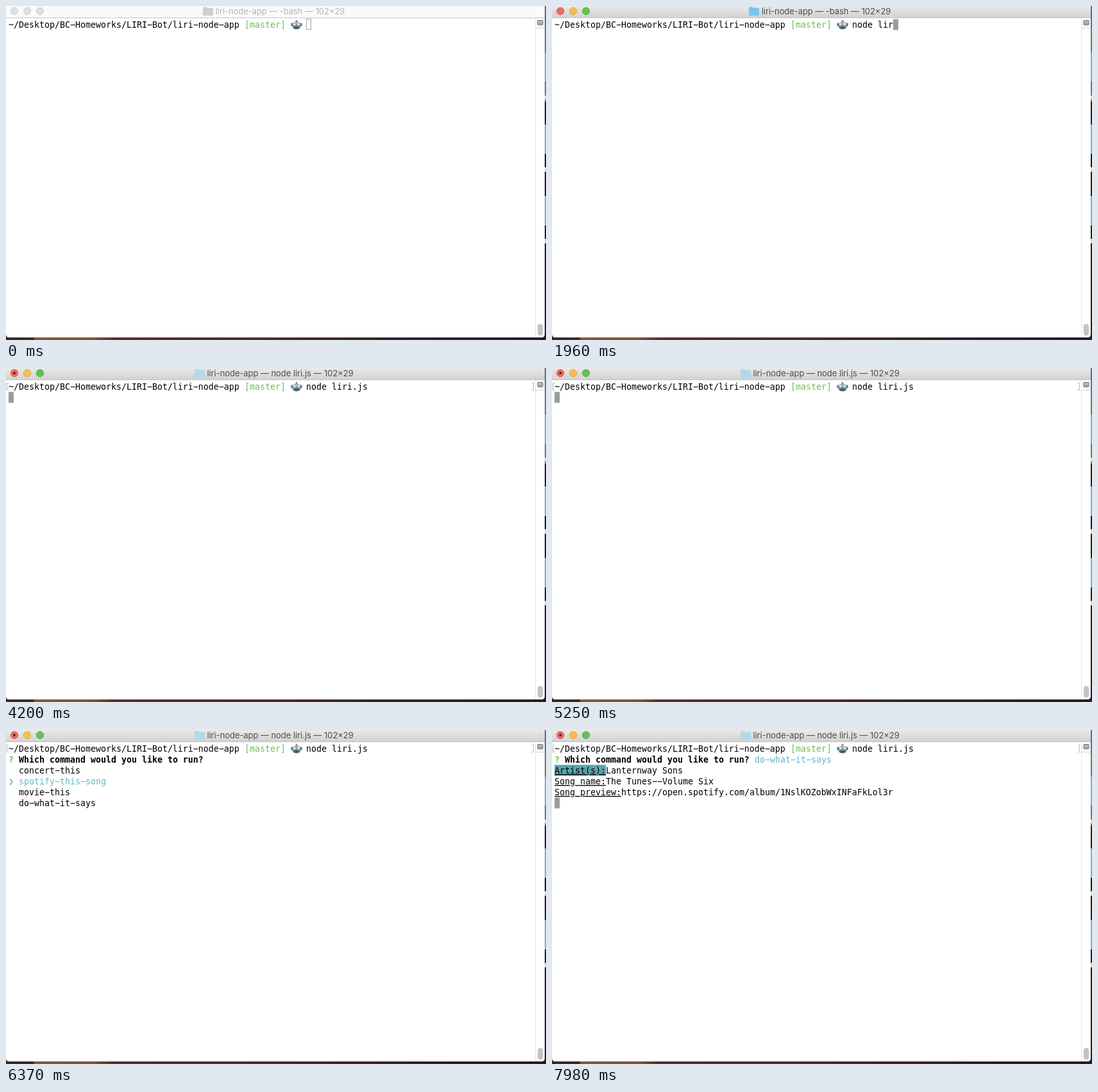
Animation, 842 px wide and 522 px high, one loop 8 s. Source, as an HTML page:

```html
<!DOCTYPE html>
<html lang="en">
<head>
<meta charset="utf-8">
<title>Terminal session</title>
<style>
  html, body { margin: 0; width: 842px; height: 522px; overflow: hidden; background: #fff; }
  svg { display: block; }
  text { white-space: pre; }
  #screen { font: 13.29px "DejaVu Sans Mono", "Liberation Mono", monospace; fill: #000; }
  #title { font: 12.9px Inter, sans-serif; text-anchor: middle; fill: #4c4c4c; }
  .bold { font-weight: bold; }
  .green { fill: #6fbf53; }
  .cyan { fill: #62bac5; }
  .mark { fill: #62bac5; font-weight: bold; }
  .grey { fill: #b2b2b2; }
  .under { text-decoration: underline; }
  .idle #title { fill: #b4b4b4; }
  .idle .light { fill: #dedede; stroke: #cfcfcf; }
  .idle #bar { fill: #fafafa; }
  .idle #folder { fill: #cfcfcf; }
</style>
</head>
<body>
<svg id="stage" width="842" height="522" viewBox="0 0 842 522">
  <defs>
    <linearGradient id="chrome" x2="0" y2="1">
      <stop stop-color="#e9e9e9"/><stop offset="1" stop-color="#d2d2d2"/>
    </linearGradient>
    <linearGradient id="desk">
      <stop stop-color="#38272a"/><stop offset=".05" stop-color="#3c2926"/>
      <stop offset=".054" stop-color="#80583a"/><stop offset=".16" stop-color="#80523a"/>
      <stop offset=".2" stop-color="#55302b"/><stop offset=".5" stop-color="#4b2b2d"/>
      <stop offset=".75" stop-color="#33202b"/><stop offset="1" stop-color="#291b23"/>
    </linearGradient>
    <linearGradient id="metal" x2="0" y2="1">
      <stop stop-color="#a5bec5"/><stop offset="1" stop-color="#526d78"/>
    </linearGradient>
    <g id="robot">
      <circle cx="8.5" cy="2" r="1.4" fill="#b9584f"/>
      <path d="M3 6Q8.5-1 14 6z" fill="#8ca8b0"/>
      <rect x="0" y="5" width="3" height="5" rx="1" fill="#4f6570"/>
      <rect x="14" y="5" width="3" height="5" rx="1" fill="#4f6570"/>
      <path d="M1.5 5Q8.5 3 15.5 5L14.5 12Q13 15 8.5 15T2.5 12z" fill="url(#metal)"/>
      <circle cx="5.3" cy="7" r="1.8" fill="#e3eef0"/><circle cx="11.7" cy="7" r="1.8" fill="#e3eef0"/>
      <path d="M8.5 7.5l1.2 2.2H7.3z" fill="#b8655c"/>
      <rect x="5" y="11" width="7" height="2" rx="1" fill="#35464e"/>
    </g>
  </defs>

  <rect width="842" height="522" fill="#2c1c22"/>
  <g id="edge"></g>
  <rect y="517" width="842" height="5" fill="url(#desk)"/>
  <path d="M0 0H840V513Q840 518 835 518H5Q0 518 0 513z" fill="#fff"/>
  <path id="bar" d="M0 0H840V18H0z" fill="url(#chrome)"/>
  <path d="M0 18.5H840" stroke="#c4c4c4"/>
  <g stroke-width=".8">
    <circle class="light" cx="13" cy="8" r="5.7" fill="#ed6a5f" stroke="#d3574d"/>
    <circle class="light" cx="33" cy="8" r="5.7" fill="#f5bf4f" stroke="#d7a23f"/>
    <circle class="light" cx="53" cy="8" r="5.7" fill="#61c454" stroke="#50a545"/>
  </g>
  <circle id="dirty" cx="13" cy="8" r="2" fill="#6b1712"/>
  <path id="folder" d="M0 2.5Q0 1 1.5 1H5.5L7 2.5H14.5Q16 2.5 16 4V13Q16 14.5 14.5 14.5H1.5Q0 14.5 0 13z"/>
  <text id="title" x="427.5" y="13"></text>

  <path d="M825.5 19V518" stroke="#e4e4e4"/>
  <path d="M825 34.5H840" stroke="#d2d2d2"/>
  <rect x="829" y="22.5" width="8" height="7" rx="1" fill="#e6e6e6" stroke="#4e4e4e"/>
  <path d="M830 25H836M830 27.5H836" stroke="#5c5c5c"/>
  <rect x="829" y="497" width="8" height="18" rx="4" fill="#c3c3c3"/>
  <g id="screen"></g>
</svg>

<script>
const LOOP = 8000, CELL = 8, ROW = 17;
const $ = id => document.getElementById(id);

const TYPING = [[0, 0], [1190, 1], [1260, 2], [1470, 3], [1610, 4], [1680, 5], [1750, 6],
  [1820, 7], [1960, 8], [2030, 9], [2450, 10], [2730, 11], [2800, 12]];
const CHOICE = [[5390, 0], [6020, 1], [6440, 2], [7070, 3]];
const AT = { focus: 840, cursor: 980, enter: 2870, title: 2940, dirty: 3290,
  menu: 5390, pick: 7630, result: 7980 };
const COMMAND = "node liri.js";
const OPTIONS = ["concert-this", "spotify-this-song", "movie-this", "do-what-it-says"];
const RESULT = [
  ["Artist(s):", "Lanternway Sons"],
  ["Song name:", "The Tunes--Volume Six"],
  ["Song preview:", "https://open.spotify.com/album/1NslKOZobWxINFaFkLol3r"]
];

// Desktop visible past the window's right side: top, height, colour
const EDGE = [[0, 32, "#597184"], [32, 41, "#77727a"], [73, 45, "#6eb5dc"], [118, 32, "#77727a"],
  [140, 6, "#d8d8d8"], [185, 46, "#6eb5dc"], [231, 20, "#18151a"], [252, 7, "#d9d9d9"],
  [297, 46, "#6eb5dc"], [364, 7, "#d5d5d5"]];
$("edge").innerHTML = EDGE.map(([y, h, c]) =>
  `<rect x="840" y="${y}" width="2" height="${h}" fill="${c}"/>`).join("");

const latest = (steps, t) => steps.filter(s => s[0] <= t).pop()[1];
const px = col => 4 + col * CELL;

// The terminal face has wide hyphens
const put = (row, col, str, cls = "") =>
  `<text x="${px(col)}" y="${34 + row * ROW}" class="${cls}">${str.replace(/-/g, "\u2212")}</text>`;

const block = (row, col, fill = "#9b9b9b", cells = 1) =>
  `<rect x="${px(col)}" y="${20.5 + row * ROW}" width="${cells * CELL}" height="17" fill="${fill}"/>`;

const hollow = (row, col) =>
  `<rect x="${px(col) + .5}" y="${20.5 + row * ROW}" width="7" height="16" fill="none" stroke="#a6a6a6"/>`;

function prompt(t) {
  const n = latest(TYPING, t);
  let out = put(0, 0, "~/Desktop/BC-Homeworks/LIRI-Bot/liri-node-app") +
    put(0, 46, "[master]", "green") +
    `<use href="#robot" x="444.5" y="21.5"/>` + put(0, 58, COMMAND.slice(0, n));
  if (t < AT.cursor) return out + hollow(0, 58);
  if (t < AT.enter) return out + block(0, 58 + n);
  return out + `<path d="M4 23.5H1.5V34.5H4M820 23.5H822.5V34.5H820" fill="none" stroke="#b5b5b5"/>`;
}

function menu(t) {
  const pick = latest(CHOICE, t);
  return (pick ? "" : put(1, 39, "(Use arrow keys)", "grey")) +
    OPTIONS.map((name, i) => i === pick
      ? put(i + 2, 0, "❯", "mark") + put(i + 2, 2, name, "cyan")
      : put(i + 2, 2, name)).join("");
}

function answer(t) {
  const picked = put(1, 39, OPTIONS[3], "cyan");
  if (t < AT.result) return picked + block(2, 0);
  return picked + block(2, 0, "#5aa3ad", 10) +
    RESULT.map(([label, value], i) =>
      put(i + 2, 0, label, "under") + put(i + 2, label.length, value)).join("") +
    block(5, 0);
}

function screen(t) {
  const top = prompt(t);
  if (t < AT.enter) return top;
  if (t < AT.menu) return top + block(1, 0);
  return top + put(1, 0, "?", "green bold") +
    put(1, 2, "Which command would you like to run?", "bold") +
    (t < AT.pick ? menu(t) : answer(t));
}

let shown = "";
function draw(t) {
  const running = t >= AT.title;
  $("stage").setAttribute("class", t < AT.focus ? "idle" : "");
  $("title").textContent = `liri-node-app — ${running ? COMMAND : "-bash"} — 102×29`;
  $("folder").setAttribute("transform", `translate(${running ? 294 : 307} 0.5)`);
  $("folder").setAttribute("fill", running ? "#b1d9ec" : "#79c5ee");
  $("dirty").setAttribute("visibility", t < AT.dirty ? "hidden" : "visible");
  const next = screen(t);
  if (next !== shown) $("screen").innerHTML = shown = next;
}

const start = performance.now();
function tick() {
  draw((performance.now() - start) % LOOP);
  requestAnimationFrame(tick);
}
tick();
</script>
</body>
</html>
```
